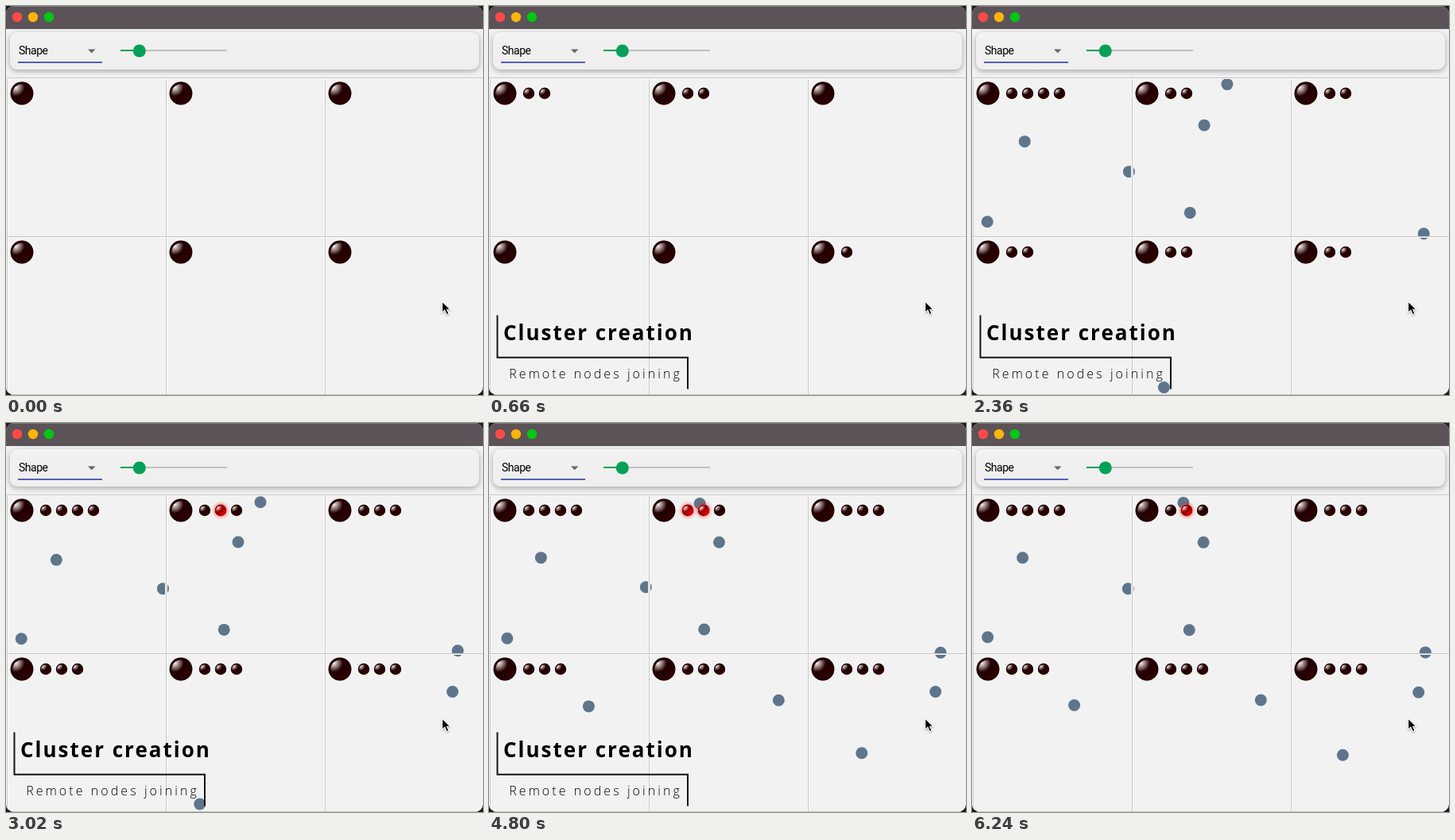
Recreate the animation shown at these times as an HTML page with a canvas. Size 600 by 490 pixels, loop 6260 ms.

```html
<!DOCTYPE html>
<html lang="en">
<head>
<meta charset="utf-8">
<title>Cluster creation</title>
<style>
html, body { margin: 0; width: 100%; height: 100%; overflow: hidden; background: #1c1b1c; }
canvas { display: block; }
</style>
</head>
<body>
<canvas id="stage" width="600" height="490"></canvas>
<script>
const ctx = document.getElementById('stage').getContext('2d');
const W = 600, H = 490, LOOP = 6260, CELL = 200, TOP = 90;

// One slot per beat: the cell that gains a lamp, or a pause
const JOINS = '01015 0 2 0 23453451342';
const BEAT = 130;

// Home of each node, in order of birth; a second home is taken at MOVE
const MOVE = 3600;
const NODES = [
  [65, 171], [197.5, 207.5], [291, 151], [320, 98.5, 265.5, 100.5], [570, 288],
  [243, 480.5, 127, 357], [272.5, 260], [21, 270.5], [560, 338.5],
  [364, 350], [467.5, 417]
];

const clamp = v => Math.max(0, Math.min(1, v));
const span = (t, a, b) => clamp((t - a) / (b - a));
const easeIn = p => p * p * p;
const easeOut = p => 1 - easeIn(1 - p);

// Seeded noise in -1..1
function noise(a, b) {
  const v = Math.sin(a * 127.1 + b * 311.7) * 43758.5453;
  return (v - Math.floor(v)) * 2 - 1;
}

function rect(x, y, w, h, color) {
  ctx.fillStyle = color;
  ctx.fillRect(x, y, w, h);
}

function disc(x, y, r, fill) {
  ctx.fillStyle = fill;
  ctx.beginPath();
  ctx.arc(x, y, r, 0, 7);
  ctx.fill();
}

function poly(points, fill) {
  ctx.fillStyle = fill;
  ctx.beginPath();
  points.forEach(([x, y]) => ctx.lineTo(x, y));
  ctx.closePath();
  ctx.fill();
}

function gradient(g, stops) {
  stops.forEach(([at, color]) => g.addColorStop(at, color));
  return g;
}

function text(str, x, y, font, spacing, color) {
  ctx.font = font;
  ctx.letterSpacing = spacing + 'px';
  ctx.fillStyle = color;
  ctx.fillText(str, x, y);
}

// All parts of a lamp are fractions of its box size
function lamp(x, y, size, on) {
  const r = size * 0.36, d = size * 0.245, h = size * 0.2;
  const [edge, mid, end] = on ? ['#c40000', '#900000', '#ff0000'] : ['#330000', '#210000', '#330000'];
  disc(x, y, r + 0.8, 'rgba(255,255,255,.4)');
  ctx.save();
  if (on) {
    ctx.shadowColor = '#ff0000';
    ctx.shadowBlur = size * 0.27;
  }
  disc(x, y, r, gradient(ctx.createLinearGradient(x - d, y - d, x + d, y + d),
    [[0, edge], [0.49, mid], [1, end]]));
  ctx.restore();
  disc(x, y, r, gradient(ctx.createRadialGradient(x, y, r * 0.8, x, y, r),
    [[0, 'rgba(0,0,0,0)'], [1, 'rgba(0,0,0,.5)']]));
  disc(x, y, size * 0.29,
    gradient(ctx.createRadialGradient(x - h, y - h, 0, x - h, y - h, size * 0.29),
      [[0, '#fff'], [1, 'rgba(255,255,255,0)']]));
}

// Lamps of the busy cells blink, each with its own period
function isLit(cell, i, t) {
  if (t < 2400) return false;
  if (cell === 1 && i < 2) return t % (400 - i * 40) < 220;
  return cell === 0 && i === 3 && t % 1100 >= 100 && t % 1100 < 300;
}

function drawNodes(t) {
  NODES.forEach((home, i) => {
    if (t < 1130 + 24 * i * i) return;
    const [x, y] = home.length > 2 && t > MOVE ? home.slice(2) : home;
    const step = Math.floor(t / 1300 + i * 0.37);
    disc(x + noise(i, step) * 2, y + noise(step, i + 20) * 1.5, 7.5, '#5f758b');
  });
}

function drawGrid() {
  for (let x = 1; x < W; x += CELL) {
    rect(x - 1, TOP + 1, 3, H, '#f8f8f8');
    rect(x, TOP + 1, 1, H, '#c6c6c6');
  }
  for (const y of [TOP, TOP + CELL, H - 1]) {
    rect(0, y, W, 2, '#f8f8f8');
    rect(0, y, W, 1, '#c6c6c6');
  }
}

function drawLamps(t) {
  const joined = JOINS.slice(0, Math.floor(t / BEAT));
  for (let cell = 0; cell < 6; cell++) {
    const x = 20 + cell % 3 * CELL, y = TOP + 20 + Math.floor(cell / 3) * CELL;
    const count = joined.split(cell).length - 1;
    lamp(x, y, 40, false);
    for (let i = 0; i < count; i++) lamp(x + 30 + i * 20, y, 20, isLit(cell, i, t));
  }
}

function drawBars() {
  rect(0, 0, W, 29, '#5b5357');
  rect(0, 0, W, 1, '#7d777a');
  ['#fd4a48', '#fdb409', '#00c715'].forEach((c, i) => disc(14 + i * 20, 14, 6.2, c));

  ctx.save();
  ctx.shadowColor = 'rgba(0,0,0,.32)';
  ctx.shadowBlur = 7;
  ctx.shadowOffsetY = 2;
  ctx.fillStyle = gradient(ctx.createLinearGradient(0, 33, 0, 80),
    [[0, '#f4f4f4'], [0.25, '#f0f0f0'], [1, '#efefef']]);
  ctx.beginPath();
  ctx.roundRect(5, 33, 590, 47, 9);
  ctx.fill();
  ctx.restore();

  text('Shape', 16, 61, '14px Roboto, sans-serif', -0.5, '#000');
  poly([[103, 54.5], [112.5, 54.5], [107.75, 59.3]], '#666');
  rect(15, 70, 106, 2, '#5660b6');
  rect(144, 55, 134, 2, '#c1c1c1');
  rect(144, 55, 24, 2, '#05a058');
  disc(167.8, 56.5, 8, '#05a058');
}

// Text slides sideways out from behind a mask edge
function slideText(str, x, y, travel, shown, font, spacing, color) {
  if (shown <= 0) return;
  ctx.save();
  ctx.beginPath();
  ctx.rect(16.5, y - 30, 300, 42);
  ctx.clip();
  text(str, x - travel * (1 - shown), y, font, spacing, color);
  ctx.restore();
}

function drawCaption(t) {
  const length = 332.5;
  const head = length * easeOut(span(t, 30, 560));
  const tail = length * easeIn(span(t, 5620, 6180));
  if (head > tail) {
    ctx.save();
    ctx.strokeStyle = '#141414';
    ctx.lineWidth = 2;
    ctx.setLineDash([head - tail, length * 2]);
    ctx.lineDashOffset = -tail;
    ctx.beginPath();
    ctx.moveTo(10.5, 389.5);
    ctx.lineTo(10.5, 442.8);
    ctx.lineTo(250, 442.8);
    ctx.lineTo(250, 482.5);
    ctx.stroke();
    ctx.restore();
  }
  const title = easeOut(span(t, 80, 580)) - easeIn(span(t, 5500, 5940));
  const sub = easeOut(span(t, 160, 650)) - easeIn(span(t, 5760, 6200));
  slideText('Cluster creation', 18, 420.7, 242, title,
    'bold 26px "Open Sans", sans-serif', 2, '#000');
  slideText('Remote nodes joining', 25.2, 469, 232, sub,
    '300 16px "Open Sans", sans-serif', 3.07, '#000');
}

function drawCursor() {
  ctx.save();
  ctx.translate(549, 373);
  ctx.shadowColor = 'rgba(0,0,0,.35)';
  ctx.shadowBlur = 2;
  ctx.shadowOffsetY = 1;
  poly([[-0.8, -1.8], [-0.8, 14.2], [2.8, 11], [5.2, 16.4], [8.6, 15], [6.3, 9.7], [10.8, 9.7]], '#fff');
  ctx.shadowColor = 'transparent';
  poly([[0.2, 0.6], [0.2, 12], [3.1, 9.3], [5.6, 15], [7.3, 14.3], [4.8, 8.7], [8.6, 8.7]], '#000');
  ctx.restore();
}

function draw() {
  const t = performance.now() % LOOP;
  rect(0, 0, W, H, '#1c1b1c');
  ctx.save();
  ctx.beginPath();
  ctx.roundRect(0, 0, W, H, 10);
  ctx.clip();
  rect(0, 0, W, H, '#f2f2f2');
  drawNodes(t);
  drawGrid();
  drawLamps(t);
  drawBars();
  drawCaption(t);
  drawCursor();
  ctx.restore();
  requestAnimationFrame(draw);
}
draw();
</script>
</body>
</html>
```
